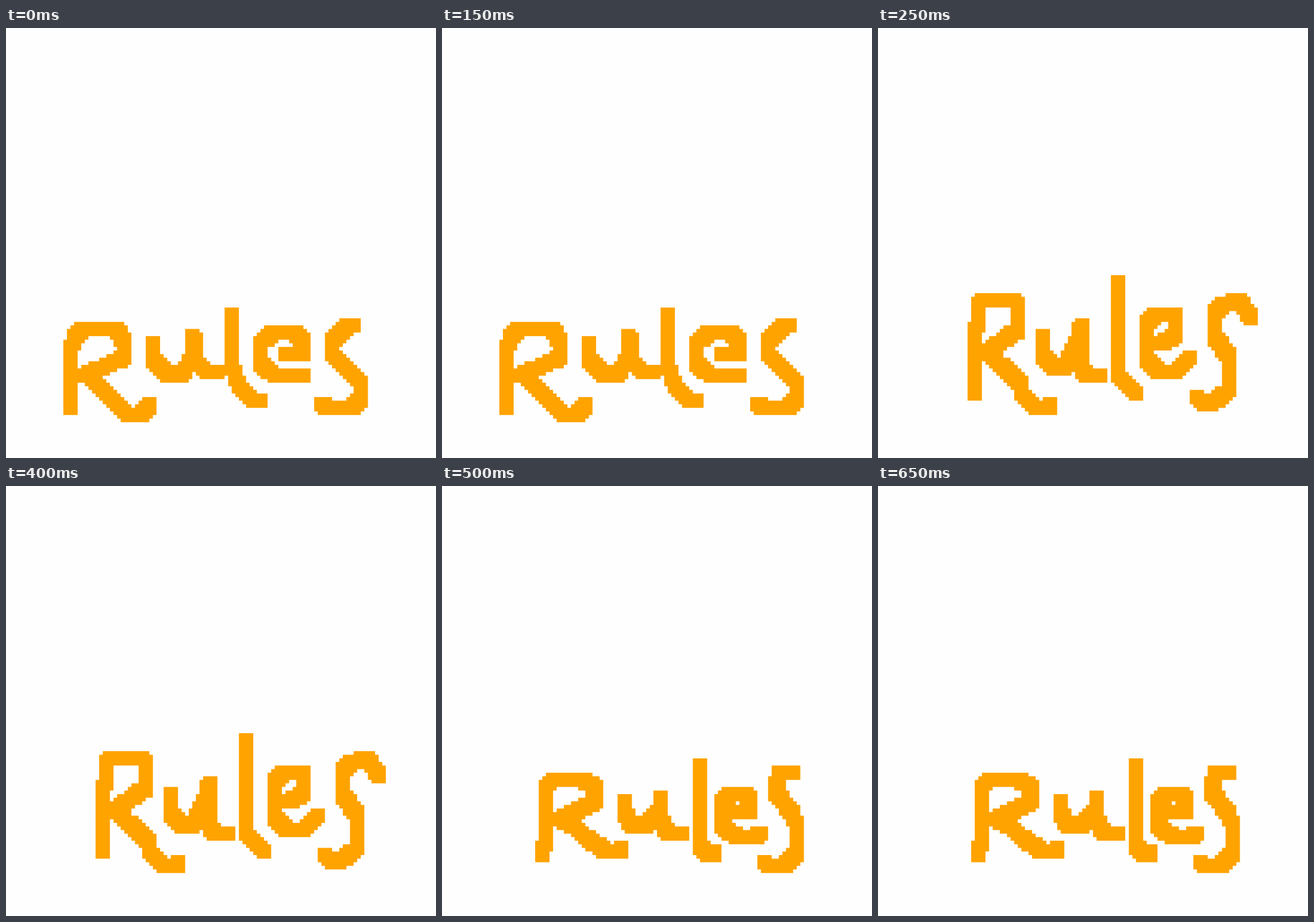
Write an HTML page with a canvas that moves like this. It is 748 px wide and 748 px high and loops after 750 ms.

```html
<!DOCTYPE html>
<html lang="en">
<head>
<meta charset="utf-8">
<title>Rules</title>
<style>
  html, body { margin: 0; width: 100%; height: 100%; overflow: hidden; background: #fefefe; }
  canvas { display: block; }
</style>
</head>
<body>
<canvas id="stage" width="748" height="748"></canvas>
<script>
const ctx = document.getElementById('stage').getContext('2d');
const GRID = 120, BRUSH = 4, HOLD = 250;
ctx.scale(748 / GRID, 748 / GRID);

// The word is written three times with a square brush, one pen path per letter.
const words = [
  {
    R: 'M16 104V89Q17 82 21 82H27Q31 82 31 90L20 95H21L32 106H36L38 103',
    u: 'M39 86V90L43 95H47L50 90V84L51 86V91L54 94H57',
    l: 'M61 78V92L63 98 67 102H69',
    e: 'M76 89H81V85L78 83H73L69 86V92L73 95H81',
    s: 'M95 81H93L89 86V89L97 97V102L94 104H88L86 103'
  },
  {
    R: 'M25 100V82L26 81V75L27 74H36L37 75V83H36L29 88 32 92H33L38 98V100L42 104H46V103',
    u: 'M44 84V89L47 93H50L54 85V82L55 81V93L56 95H60',
    l: 'M65 69V95L70 100',
    e: 'M76 86H77L81 84V78H75L73 81V90L76 94H81L85 90',
    s: 'M102 79L99 74H98L93 76 92 78V84L96 90V99L91 103H89L87 101'
  },
  {
    R: 'M26 101V99L27 98V82L29 80H37L41 82V86L31 91 35 93 38 96 44 100H48V99',
    u: 'M49 86V89L51 93H55L59 88V85V91L61 95H65',
    l: 'M70 76V98L72 101H74V100',
    e: 'M77 89H84V85L82 84H78V85L76 86V92L77 94 81 96H85L87 95',
    s: 'M96 78H92V80L91 81V83L96 90 97 93V100L94 104H89L88 103'
  }
];

// Stamps the brush on every grid cell that the pen passes.
function addStroke(shape, d) {
  const pen = document.createElementNS('http://www.w3.org/2000/svg', 'path');
  pen.setAttribute('d', d);
  const steps = Math.ceil(pen.getTotalLength() * 4);
  const seen = new Set();
  for (let i = 0; i <= steps; i++) {
    const point = pen.getPointAtLength(i / 4);
    const x = Math.round(point.x), y = Math.round(point.y);
    const key = y * GRID + x;
    if (seen.has(key)) continue;
    seen.add(key);
    shape.rect(x, y, BRUSH, BRUSH);
  }
}

const poses = words.map(word => {
  const shape = new Path2D();
  for (const d of Object.values(word)) addStroke(shape, d);
  return shape;
});

function render() {
  const pose = poses[Math.floor(performance.now() / HOLD) % poses.length];
  ctx.fillStyle = '#fefefe';
  ctx.fillRect(0, 0, GRID, GRID);
  ctx.fillStyle = '#ffa300';
  ctx.fill(pose);
  requestAnimationFrame(render);
}
render();
</script>
</body>
</html>
```
